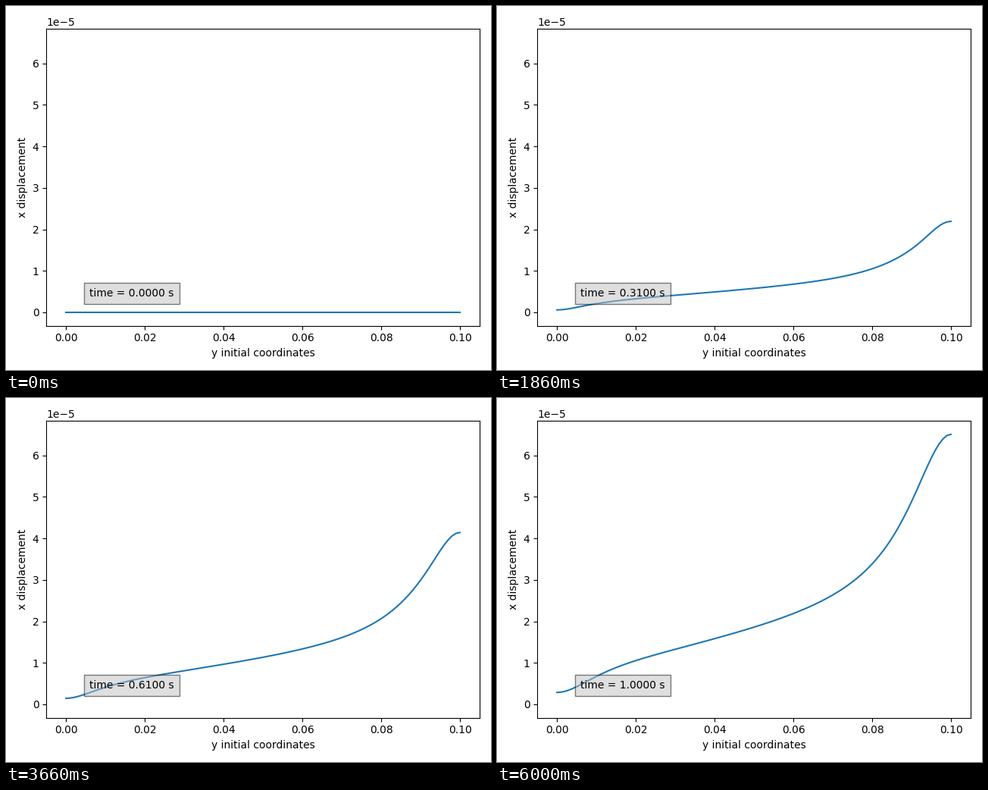
These frames come from a looping animation (640 by 480 pixels, 6060 ms). A matplotlib script:

```python
import numpy as np
import matplotlib.pyplot as plt
from matplotlib.animation import FuncAnimation

FRAMES = 101
INTERVAL = 60
LENGTH = 0.1

y = np.linspace(0, LENGTH, 101)
q = LENGTH - y  # distance from the far end


def lorentz(d, width):
    return 1 / (1 + (d / width) ** 2)


def gauss(d, width):
    return np.exp(-(d / width) ** 2)


# Linear ramp flattened at both ends, a peak at the far end, a dip at the near
ramp = np.hypot(y, 0.004) + q - np.hypot(q, 0.002)
rate = (0.61 + 20 * ramp
        + 3.936 * lorentz(q, 0.01305)
        - 0.47 * lorentz(y, 0.0155) ** 2)
# Sharper ends at the start, fading with time
early = 0.92 * gauss(q, 0.006) - 0.16 * gauss(y, 0.005)


def displacement(t):
    left = 1 - t
    weight = 0.65 * left + 0.35 * left ** 2
    return 1e-5 * t * (rate + weight * early)


fig, ax = plt.subplots(figsize=(6.4, 4.8), dpi=100)
line, = ax.plot(y, displacement(0))
top = displacement(1).max()
ax.set_xlim(-0.05 * LENGTH, 1.05 * LENGTH)
ax.set_ylim(-0.05 * top, 1.05 * top)
ax.set_xlabel("y initial coordinates")
ax.set_ylabel("x displacement")
label = ax.text(0.1, 0.1, "time = 0.0000 s", transform=ax.transAxes,
                bbox=dict(boxstyle="square,pad=0.5", facecolor="silver",
                          edgecolor="black", alpha=0.5))
fig.tight_layout()


def update(n):
    t = n / (FRAMES - 1)
    line.set_ydata(displacement(t))
    label.set_text(f"time = {t:.4f} s")
    return line, label


anim = FuncAnimation(fig, update, frames=FRAMES, interval=INTERVAL,
                     repeat=True, repeat_delay=0)
plt.show()
```
